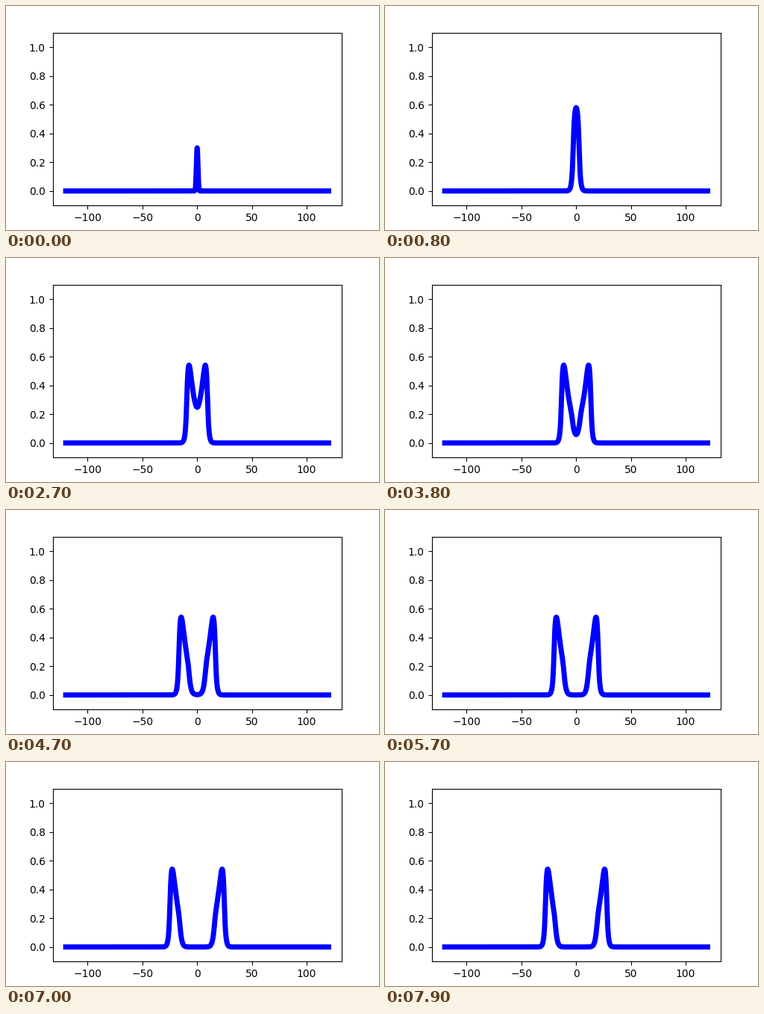
Recreate the animation shown at these times as a matplotlib script. Size 500 by 300 pixels, loop 8 s.

```python
import numpy as np
import matplotlib.pyplot as plt
from matplotlib.animation import FuncAnimation

# Neural field with synaptic depression: a spark splits into two travelling pulses
FRAMES, STEPS = 80, 10
SPAN, DX = 120, 0.1
DT = 0.355 / STEPS
THETA, ALPHA, BETA = 0.2, 20, 0.253

x = np.linspace(-SPAN, SPAN, int(round(2 * SPAN / DX)) + 1)
reach = np.arange(-120, 121) * DX
kernel = np.exp(-np.abs(reach))
kernel /= kernel.sum()


def firing(u):
    """Threshold, softened over about one grid cell."""
    return np.clip(0.5 + (u - THETA) / 0.02, 0, 1)


def simulate():
    u = 0.3 * np.exp(-x**2)
    q = np.ones_like(x)
    states = [u]
    for _ in range(FRAMES - 1):
        for _ in range(STEPS):
            active = q * firing(u)
            drive = np.convolve(active, kernel, mode="same")
            u = u + DT * (drive - u)
            q = q + DT * ((1 - q) / ALPHA - BETA * active)
        states.append(u)
    return states


states = simulate()

fig, ax = plt.subplots(figsize=(5, 3), dpi=100)
line, = ax.plot(x, states[0], color="blue", lw=5)
ax.set_ylim(-0.1, 1.1)


def update(i):
    line.set_ydata(states[i])
    return line,


anim = FuncAnimation(fig, update, frames=FRAMES, interval=100,
                     repeat=True, repeat_delay=0)
plt.show()
```
